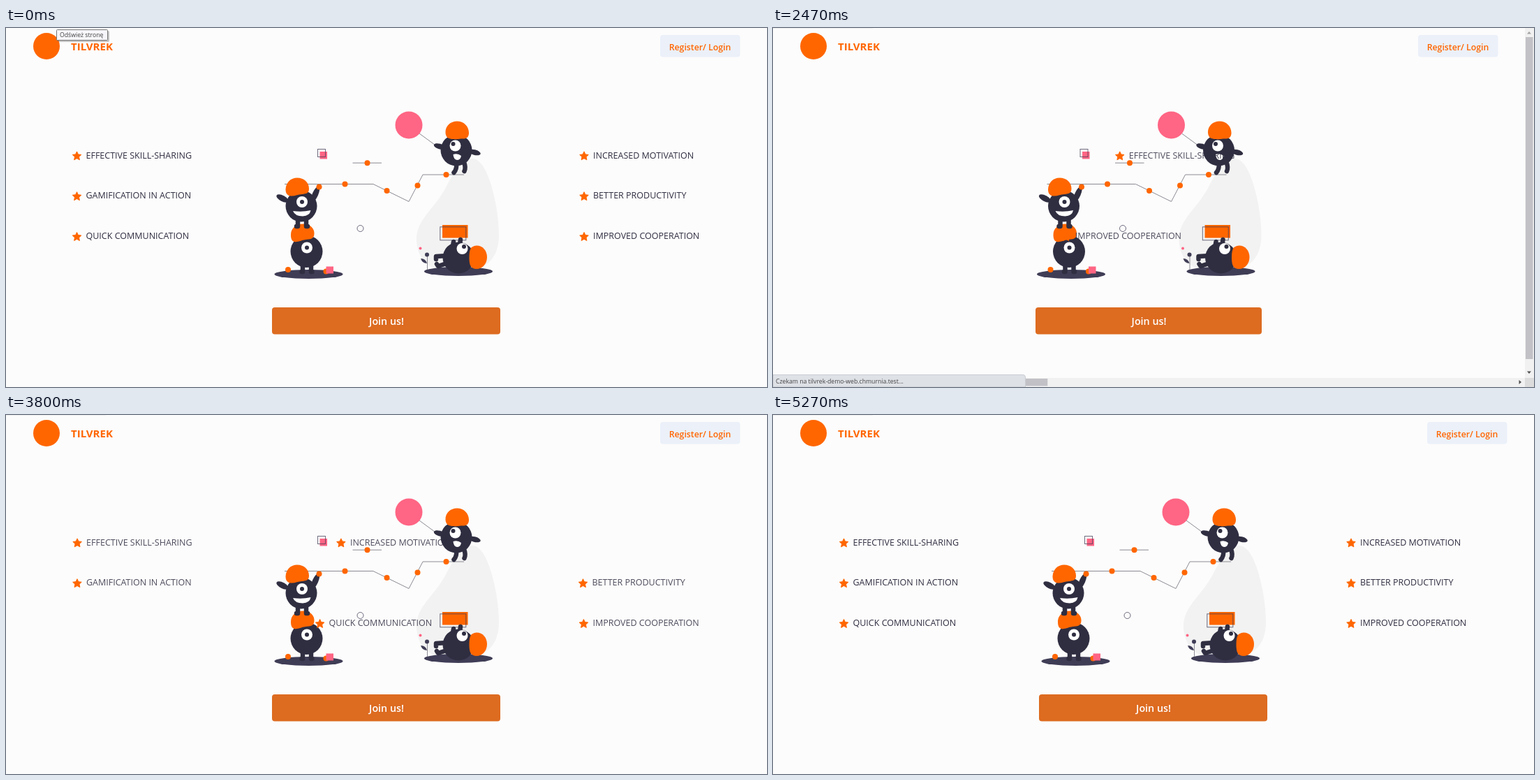
An HTML page for the animation above (5.34 s loop, 1090 by 514 pixels).

```html
<!DOCTYPE html>
<html lang="en">
<head>
<meta charset="utf-8">
<title>Landing page</title>
<style>
  html, body { margin: 0; width: 100%; height: 100%; overflow: hidden; background: #fcfcfc; }
  svg { display: block; width: 100%; height: 100%; font-family: "Open Sans", "Noto Sans", sans-serif; }
  .o { fill: #f60; }
  .d { fill: #2f2e41; }
  .w { fill: #fff; }
  .p { fill: #ff6584; }
  .g { fill: #3f3d56; }
  .line { fill: none; stroke: #8b8b94; }
  .box { fill: none; stroke: #3f3d56; stroke-opacity: .75; }
  .limb { fill: none; stroke: #2f2e41; stroke-width: 6.5; stroke-linecap: round; stroke-linejoin: round; }
  .item { font-size: 12.5px; fill: #2f2e41; }
  .brand { font-size: 15px; font-weight: 700; fill: #f60; }
  .btn { font-weight: 600; text-anchor: middle; }
  .small { font-size: 8.7px; fill: #444; }
</style>
</head>
<body>
<svg viewBox="0 0 1090 514" xmlns="http://www.w3.org/2000/svg">
  <defs>
    <path id="star" class="o" stroke="#f60" stroke-linejoin="round"/>
    <g id="eye"><circle class="w" r="8"/><circle class="d" r="3"/></g>
  </defs>

  <rect id="edge" width="143" height="1" fill="#f1f1f1"/>
  <circle id="logo" class="o" cx="58" cy="26" r="19"/>
  <g id="alt">
    <path class="o" d="M38 6h9l4.500 4.500v3l-5 6H38z"/>
    <text x="51" y="21" font-size="12.400" class="o">Tilvrek logo</text>
  </g>
  <text id="brand" class="brand" y="32">TILVREK</text>

  <g id="login">
    <rect x="937" y="10" width="114.500" height="31.500" rx="4" fill="#ebf0f9"/>
    <text class="btn o" x="994" y="31.500" font-size="12.300">Register/ Login</text>
  </g>

  <g id="art">
    <path fill="#f2f2f2" d="M668 187C690 186 706 255 706 297C706 325 692 345 660 348L618 346C600 340 588 325 588 302C588 275 612 260 628 232C640 210 650 188 668 187Z"/>
    <path class="line" d="M399 223.500H526L577 248.500L597 210H656M496.500 193.200H538M592 151L618 170"/>
    <circle class="p" cx="577" cy="139" r="19.500"/>
    <rect class="p" x="449.500" y="177" width="10.500" height="10.500"/>
    <rect class="box" x="446.500" y="173.500" width="11" height="11"/>
    <circle class="box" cx="507.500" cy="287" r="4.500"/>
    <rect class="o" x="625" y="282" width="36.500" height="18.500"/>
    <rect class="box" x="621.800" y="284.800" width="37" height="19"/>
    <ellipse class="g" cx="433.500" cy="352.500" rx="49" ry="6.500"/>
    <ellipse class="g" cx="648" cy="348.500" rx="49" ry="6.500"/>

    <!-- lower left figure -->
    <circle class="d" cx="430.500" cy="320" r="23"/>
    <path class="limb" d="M425 338V349H423.500M437 338V349H438.500"/>
    <path class="o" d="M408 296C408 287 415 280.500 425 280.500C436 280.500 442 287 441.500 295C441 303 435 302 429 303C422 304 418 307 413 306C409 305 408 301 408 296Z"/>
    <use href="#eye" x="431" y="314.500"/>

    <!-- upper left figure -->
    <path class="limb" d="M418 274V284H416M430 274V284H432"/>
    <ellipse class="d" rx="9.500" ry="4.200" transform="translate(396 244) rotate(27)"/>
    <ellipse class="d" rx="4.200" ry="12" transform="translate(443 238) rotate(24)"/>
    <circle class="d" cx="423" cy="255" r="22.500"/>
    <path class="o" d="M400.500 231C401 221 408 214.500 417 214.500C427 214.500 434 221 434 230C434 237 430 237 424 238C418 238 414 241 408 240.500C403 240 400.500 237 400.500 231Z"/>
    <use href="#eye" x="424" y="249"/>
    <path class="w" d="M411 262Q424 264 436.500 261Q435 269 425 269.500Q414 269.500 411 262Z"/>

    <!-- upper right figure -->
    <path class="limb" d="M645 194Q646 202 641.500 207M656 192Q659 200 656.500 205"/>
    <ellipse class="d" rx="8.500" ry="3.800" transform="translate(621 169.500) rotate(16)"/>
    <ellipse class="d" rx="9" ry="3.800" transform="translate(671 178) rotate(14)"/>
    <circle class="d" cx="645" cy="175" r="22.500"/>
    <path class="o" d="M629.500 150C629 140 637 133.500 646 133.500C656 133.500 663 141 663 150C663 157 659 159 653 158.500C649 158 646 160 641 159C634 159 630 157 629.500 150Z"/>
    <circle class="w" cx="643.500" cy="168.500" r="8"/>
    <circle class="d" cx="640.500" cy="166" r="3"/>
    <path class="w" d="M640.500 181Q647 179 652 183Q651 189 646 189Q641 188 640.500 181Z"/>

    <!-- lying figure -->
    <path class="limb" d="M632 326L616 327V331M634 336L619 341L617 338M640 312L641 306M650 310L651 303"/>
    <circle class="d" cx="648" cy="329" r="22.500"/>
    <path class="o" d="M663.500 329C663.500 318 665 312 674 311.500C683 311.500 689 319 689 328C689 338 682 345 674 345C666 345 663.500 340 663.500 329Z"/>
    <circle class="w" cx="653.500" cy="316" r="8"/>
    <circle class="d" cx="656" cy="313" r="3"/>

    <path class="line" d="M603.500 325V346"/>
    <circle class="g" cx="603" cy="324.500" r="3"/>
    <path class="g" d="M594 330Q601 330 603 337Q596 337 594 330Z"/>
    <circle class="p" cx="593.500" cy="315.500" r="2"/>
    <g id="dots"></g>
    <rect class="p" x="458.500" y="341.500" width="10.500" height="10"/>
  </g>

  <g id="wait">
    <rect x="384.500" y="79.500" width="321" height="321" fill="none" stroke="#c6c6c6"/>
    <g fill="none" stroke-width="7.500">
      <circle cx="564" cy="276.500" r="16" stroke="#e3e5ee"/>
      <path id="spin" d="M580 276.500a16 16 0 0 1-32 0" stroke="#f60"/>
    </g>
  </g>

  <rect id="join" y="400" height="38.500" rx="4" fill="#dd6b20"/>
  <text id="joinText" class="btn w" y="425" font-size="14.300">Join us!</text>
  <g id="items"></g>

  <g id="hbar">
    <rect y="501" width="1090" height="13" fill="#f1f1f1"/>
    <path d="M8.500 504v6l-3.500-3z" fill="#a3a3a3"/>
    <path id="next" d="M1081.500 504v6l3.500-3z" fill="#505050"/>
    <rect id="thumb" x="13" y="502" height="10.500" fill="#c1c1c6"/>
  </g>
  <g id="vbar">
    <rect x="1077" width="13" height="501" fill="#f1f1f1"/>
    <rect x="1077" y="501" width="13" height="13" fill="#dcdcdc"/>
    <rect x="1078" y="13" width="10.500" height="461" fill="#c1c1c6"/>
    <path d="M1080 8.500h6l-3-3.500z" fill="#a3a3a3"/>
    <path d="M1080 491.500h6l-3 3.500z" fill="#505050"/>
  </g>

  <g id="status">
    <path d="M0 496.500H358Q361.500 496.500 361.500 500V514H0Z" fill="#dee1e6" stroke="#c9ccd1"/>
    <text class="small" x="4" y="509">Czekam na tilvrek-demo-web.chmurnia.test...</text>
  </g>
  <g id="tip">
    <rect x="74" y="4" width="74" height="16" rx="2" fill="#000" opacity=".22"/>
    <rect x="72.500" y="2.500" width="73" height="15" rx="1" fill="#f6f6fa" stroke="#767676"/>
    <text class="small" x="77" y="13">Odśwież stronę</text>
  </g>
</svg>
<script>
const LOOP = 5340, TICK = 200 / 3;
const RELOAD = 2130, LOADED = 2270, WIDTH = 1090, BAR = 13;
const FAR = 2000, STIFFNESS = 120, DAMPING = 10, REST = 1800;
const $ = id => document.getElementById(id);
const make = (tag, parent, attrs = {}) => {
  const el = document.createElementNS("http://www.w3.org/2000/svg", tag);
  for (const k in attrs) el.setAttribute(k, attrs[k]);
  return parent.appendChild(el);
};
const show = (id, on) => { $(id).style.display = on ? "" : "none"; };
const shift = (el, x) => el.setAttribute("transform", `translate(${x.toFixed(2)} 0)`);

$("star").setAttribute("d", "M" + Array.from({ length: 10 }, (_, i) => {
  const r = i % 2 ? 3.2 : 6.6, a = i * Math.PI / 5;
  return (r * Math.sin(a)).toFixed(2) + " " + (-r * Math.cos(a)).toFixed(2);
}).join("L") + "Z");

for (const [cx, cy] of [[448.5, 227.5], [485.5, 223.5], [517.5, 193.2], [545.5, 233],
                        [589.5, 225.5], [630.5, 210], [404, 346], [458.5, 348.5]])
  make("circle", $("dots"), { class: "o", cx, cy, r: 4 });

// text, side (-1 left, 1 right), row, start of the slide, right edge
const items = [
  ["EFFECTIVE SKILL-SHARING", -1, 0, 2156, 265],
  ["GAMIFICATION IN ACTION", -1, 1, 2630, 268],
  ["QUICK COMMUNICATION", -1, 2, 3427, 264],
  ["INCREASED MOTIVATION", 1, 0, 3427, 987.5],
  ["BETTER PRODUCTIVITY", 1, 1, 2646, 972],
  ["IMPROVED COOPERATION", 1, 2, 2156, 994]
].map(([text, side, row, start, edge]) => {
  const g = make("g", $("items")), x = side < 0 ? 114.5 : 841, y = 182.5 + row * 57.8;
  make("use", g, { href: "#star", x: x - 13, y: y + 1 });
  const label = make("text", g, { class: "item", x, y: y + 4 });
  label.textContent = text;
  return { g, label, side, start, edge };
});

// Underdamped spring released from 1 at rest
function spring(s) {
  if (s <= 0) return 1;
  const decay = DAMPING / 2, w = Math.sqrt(STIFFNESS - decay * decay);
  return Math.exp(-decay * s) * (Math.cos(w * s) + decay / w * Math.sin(w * s));
}

function draw(t) {
  const fresh = t >= RELOAD, waiting = fresh && t < LOADED;
  let extent = 0;
  for (const it of items) {
    const moving = fresh && t < it.start + REST;
    it.x = moving ? it.side * FAR * spring((t - it.start) / 1000) : 0;
    // text on a moving layer renders a little lighter
    it.label.style.opacity = moving ? 0.85 : 1;
    extent = Math.max(extent, it.edge + it.x);
  }
  const hbar = extent > WIDTH, vbar = hbar && !waiting;
  const view = vbar ? WIDTH - BAR : WIDTH, lost = view - WIDTH;
  for (const it of items) shift(it.g, it.x + lost * (it.side < 0 ? 1 : 5) / 6);

  show("edge", t >= 270);
  show("logo", !waiting);
  show("alt", waiting);
  show("art", !waiting);
  show("wait", waiting);
  show("hbar", hbar);
  show("vbar", vbar);
  show("tip", t < 70);
  show("status", t >= 270 && t < 2730);
  $("status").style.opacity = t < 400 ? 0.5 : 1;

  $("brand").setAttribute("x", waiting ? 130 : 93);
  shift($("login"), lost);
  shift($("art"), lost / 2);
  $("join").setAttribute("x", Math.floor(view * 0.35));
  $("join").setAttribute("width", Math.ceil(view * 0.3));
  $("joinText").setAttribute("x", view / 2);
  shift($("next"), lost);
  $("thumb").setAttribute("width", (view - 2 * BAR) * Math.min(1, view / (extent + lost * 5 / 6)));
  $("spin").setAttribute("transform", `rotate(${3 + (t - RELOAD) * 0.36} 564 276.5)`);
}

function snap(t) {
  return Math.round(Math.floor((t + 5) / TICK) * TICK / 10) * 10;
}

const begin = performance.now();
function frame() {
  draw(snap((performance.now() - begin) % LOOP));
  requestAnimationFrame(frame);
}
frame();
</script>
</body>
</html>
```
